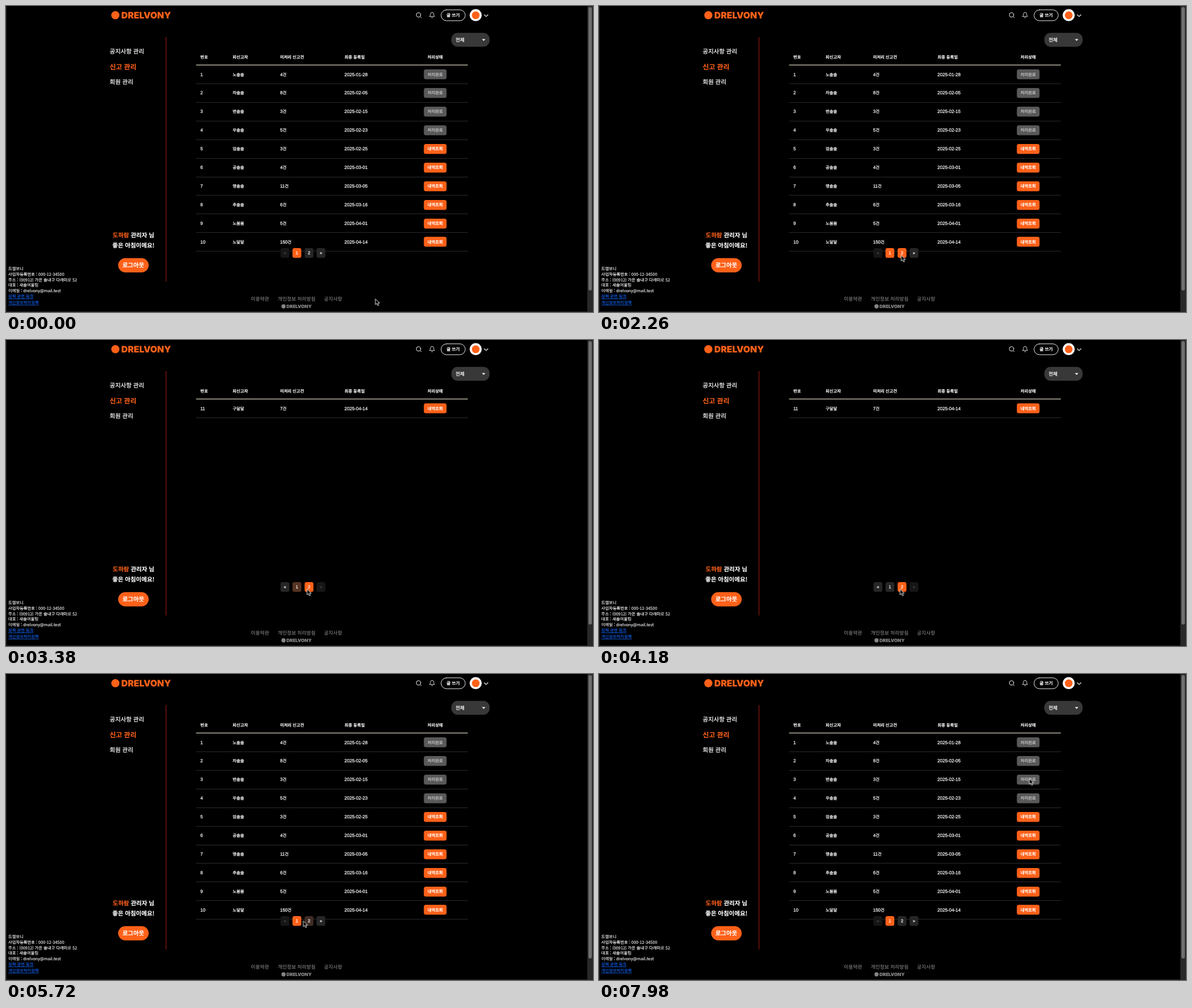
Recreate the animation shown at these times as an HTML page. Size 1036 by 541 pixels, loop 8000 ms.

```html
<!DOCTYPE html>
<html lang="ko">
<head>
<meta charset="utf-8">
<title>신고 관리</title>
<style>
  :root { --orange: #ff6119; --dark: #262626; }
  html, body { margin: 0; width: 100%; height: 100%; overflow: hidden; background: #000; }
  svg { display: block; width: 1036px; height: 541px; color: #fff; }
  /* The thin stroke gives a medium weight between regular and bold. */
  text {
    font: 400 7.3px "Noto Sans CJK KR", "Noto Sans CJK", "Noto Sans", sans-serif;
    fill: currentColor; stroke: currentColor; stroke-width: .25px;
    text-rendering: geometricPrecision; white-space: pre;
  }
  tspan { fill: currentColor; stroke: currentColor; }
  .bold { font-weight: 700; stroke-width: .1px; }
  .mid { text-anchor: middle; }
  .menu { font-size: 10.5px; }
  .accent { color: var(--orange); fill: currentColor; }
  .num { font: 8px "Liberation Sans", Arial, sans-serif; }
  .info text { stroke-width: .12px; }
  .info .link { color: #1260ee; text-decoration: underline; }
  .foot { color: #858585; fill: currentColor; }
  .foot text { font-size: 8.7px; stroke-width: .1px; }
  .foot .brand { font-size: 8px; }
  .brand { font-family: Inter, sans-serif; font-weight: 900; font-size: 15.8px; stroke-width: 0; }
  .line { fill: none; stroke: #eee; stroke-linecap: round; stroke-linejoin: round; }
  .rule { stroke: #2b2b31; }
  .done rect { fill: #595959; }
  .done text { color: #c4c4c4; }
  .open rect { fill: var(--orange); }

  .first, .second, .one, .two, .cursor { animation: 8s infinite; }
  .first, .second { animation-timing-function: step-end; }
  .first { animation-name: first; }
  .second { animation-name: second; }
  .one { animation-name: one; fill: var(--orange); }
  .two { animation-name: two; fill: var(--dark); }
  .cursor { animation-name: move; animation-timing-function: ease-in-out; }

  @keyframes first { 0% { opacity: 1 } 41.375% { opacity: 0 } 70.375%, 100% { opacity: 1 } }
  @keyframes second { 0% { opacity: 0 } 41.375% { opacity: 1 } 70.375%, 100% { opacity: 0 } }
  @keyframes one {
    0%, 41.375% { fill: var(--orange) }
    43.25%, 57% { fill: var(--dark) }
    58.9%, 100% { fill: var(--orange) }
  }
  @keyframes two {
    0%, 9.4% { fill: var(--dark) }
    11.3%, 70.375% { fill: var(--orange) }
    72.25%, 100% { fill: var(--dark) }
  }
  @keyframes move {
    0%, 1% { transform: translate(651.8px, 517.7px) }
    10.6%, 38% { transform: translate(533.3px, 440.6px) }
    41.5%, 52% { transform: translate(531.3px, 440.3px) }
    59%, 68% { transform: translate(519.7px, 438.6px) }
    71%, 78% { transform: translate(524.6px, 436.4px) }
    92%, 100% { transform: translate(759.5px, 184.8px) }
  }
</style>
</head>
<body>
<svg viewBox="0 0 1036 541">
  <rect width="1036" height="541"/>
  <path d="M.5 1V540.5H1026" fill="none" stroke="#24282e"/>
  <rect x="1026" width="10" height="541" fill="#292929"/>
  <rect x="1028" y="2" width="6" height="501" rx="3" fill="#707070"/>

  <circle class="accent" cx="193" cy="16.3" r="7.2"/>
  <text class="brand accent" x="203.5" y="22">DRELVONY</text>

  <g class="line">
    <circle cx="728" cy="15.7" r="3.9"/>
    <path d="M731 18.7l2 2"/>
    <path d="M747.8 18.6h8.4q-1.3-1.3-1.3-4.2a2.9 3 0 0 0-5.8 0q0 2.9-1.3 4.2zM751 20.7h2" stroke-width=".9"/>
    <rect x="767.8" y="6.8" width="42.7" height="19.2" rx="9.6"/>
    <path d="M844.2 15.5l3.2 3.2 3.2-3.2" stroke-width="1.2"/>
  </g>
  <text class="bold mid" x="789.2" y="19.2" style="font-size:7.7px">글 쓰기</text>
  <circle cx="829" cy="16.2" r="10.6" fill="#fff"/>
  <circle class="accent" cx="829" cy="16.4" r="6.8"/>

  <rect x="786" y="47.5" width="67.5" height="24.5" rx="11" fill="#383838"/>
  <text x="793.5" y="62.6" style="font-size:8.5px">전체</text>
  <path d="M840 58.6h6l-3 3.2z" fill="#fff"/>

  <path d="M282.4 55V487" stroke="#a81d12"/>
  <text class="menu" x="183" y="84.3">공지사항 관리</text>
  <text class="bold accent" x="183" y="111.8" style="font-size:11.9px">신고 관리</text>
  <text class="menu" x="183" y="138.4">회원 관리</text>
  <text class="menu bold mid" x="225" y="409.4"><tspan class="accent">도하람</tspan> 관리자 님</text>
  <text class="menu bold mid" x="225" y="426.8">좋은 아침이에요!</text>
  <rect class="accent" x="198" y="445.7" width="53.8" height="25.2" rx="12.6"/>
  <text class="menu bold mid" x="224.7" y="462">로그아웃</text>

  <g class="info">
    <text x="4" y="467.2">드렐보니</text>
    <text x="4" y="477">사업자등록번호 : 000-12-34500</text>
    <text x="4" y="486.6">주소 : (00912) 가온 솔내구 다래미로 52</text>
    <text x="4" y="496.2">대표 : 새솔여울팀</text>
    <text x="4" y="505.8">이메일 : drelvony@mail.test</text>
    <text class="link" x="4" y="516.4">정책 관련 링크</text>
    <text class="link" x="4" y="527.4">개인정보처리정책</text>
  </g>

  <g class="foot">
    <text x="432.2" y="520.6">이용약관</text>
    <text x="479.8" y="520.6">개인정보 처리방침</text>
    <text x="561.2" y="520.6">공지사항</text>
    <circle cx="489.8" cy="531" r="3.7"/>
    <text class="brand" x="495" y="533.9">DRELVONY</text>
  </g>

  <text class="bold" x="343" y="92.7">번호</text>
  <text class="bold" x="400" y="92.7">피신고자</text>
  <text class="bold" x="483.7" y="92.7">미처리 신고건</text>
  <text class="bold" x="597.5" y="92.7">최종 등록일</text>
  <text class="bold mid" x="757.5" y="92.7">처리상태</text>
  <path d="M335.5 104.4H815" stroke="#d6cdbb" stroke-width="1.2"/>
  <g class="first" id="page1"></g>
  <g class="second" id="page2"></g>
  <g id="pager"></g>

  <path class="cursor" d="M0 0V10.2L2.4 8 4.1 11.9 6 11.1 4.3 7.3H7.5Z" fill="#000" stroke="#fff" stroke-width=".9" stroke-linejoin="round"/>
</svg>
<script>
  const people = [
    ['노솔솔', 4, '01-28'], ['차솔솔', 8, '02-05'], ['변솔솔', 3, '02-15'], ['우솔솔', 5, '02-23'],
    ['엄솔솔', 3, '02-25'], ['공솔솔', 4, '03-01'], ['맹솔솔', 11, '03-05'], ['추솔솔', 6, '03-16'],
    ['노봄봄', 5, '04-01'], ['노달달', 150, '04-14'], ['구달달', 7, '04-14']
  ];
  const byId = id => document.getElementById(id);

  function row([name, count, date], index) {
    const y = 120.8 + 32.93 * (index % 10);
    const base = y + 2.7;
    const done = index < 4;
    return `<text class="num" x="343" y="${base}">${index + 1}</text>
      <text x="400" y="${base}">${name}</text>
      <text x="483.7" y="${base}"><tspan class="num">${count}</tspan>건</text>
      <text class="num" x="597.3" y="${base}">2025-${date}</text>
      <g class="${done ? 'done' : 'open'}">
        <rect x="737.5" y="${Math.round(y - 8.7)}" width="40" height="17.5" rx="3.5"/>
        <text class="${done ? 'mid' : 'bold mid'}" x="757.5" y="${base}">${done ? '처리완료' : '내역조회'}</text>
      </g>
      <path class="rule" d="M335.5 ${Math.floor(y + 16.6) + .5}H815"/>`;
  }

  function pageButton(x, label, attrs, ink = '#fff') {
    return `<rect ${attrs} x="${x}" y="428" width="15.6" height="17.2" rx="3.5"/>
      <text class="num mid" x="${x + 7.8}" y="439.2" style="color:${ink};font-size:7.6px">${label}</text>`;
  }
  const off = (x, label) => pageButton(x, label, 'fill="#161616"', '#4a4a4a');
  const on = (x, label) => pageButton(x, label, 'fill="#262626"');

  const rows = people.map(row);
  byId('page1').innerHTML = rows.slice(0, 10).join('');
  byId('page2').innerHTML = rows[10];
  byId('pager').innerHTML = `
    <g class="first">${off(484.5, '«')}${on(548, '»')}</g>
    <g class="second">${on(484.5, '«')}${off(548, '»')}</g>
    ${pageButton(505.6, 1, 'class="one"')}${pageButton(527, 2, 'class="two"')}`;
</script>
</body>
</html>
```
